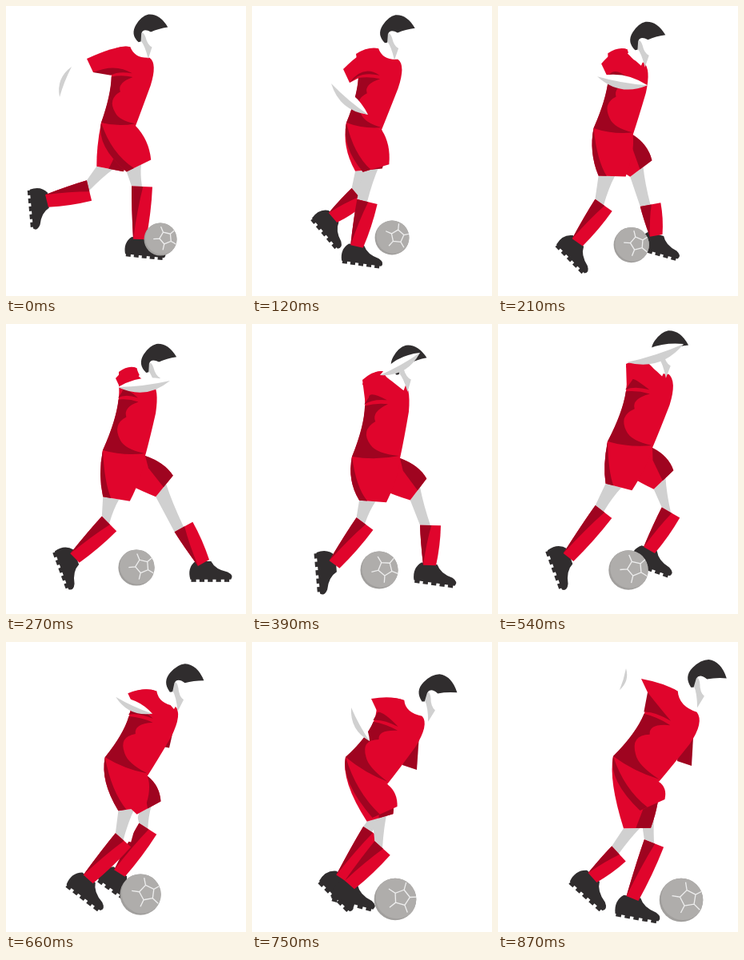
An HTML page with a canvas for the animation above (0.9 s loop, 300 by 363 pixels).

```html
<!DOCTYPE html>
<html lang="en">
<head>
<meta charset="utf-8">
<title>Footballer dribbling</title>
<style>
html, body { margin: 0; width: 100%; height: 100%; overflow: hidden; background: #fff; }
canvas { display: block; width: 300px; height: 363px; }
</style>
</head>
<body>
<canvas id="stage" width="300" height="363"></canvas>
<script>
const ctx = document.getElementById('stage').getContext('2d');
const LOOP = 900, STEP = 30;
const KEYS = [30, 120, 270, 390, 540, 750, 870];
const RED = '#e0052c', DARK = '#9f0420', BLACK = '#302d2e', GREY = '#d0d0d0', WHITE = '#fff';

// Skeleton: where each joint is at every key time; all outlines follow from it.
const RIG = {
  head:      [[178,28], [179,29], [188,43], [193,45], [212,27], [230,59], [259,41]],
  nape:      [[128,58], [130,60], [141,60], [138,70], [160,50], [158,72], [190,56]],
  collar:    [[180,62], [183,64], [183,70], [188,68], [214,60], [214,90], [250,85]],
  waistBack: [[119,146], [118,146], [121,158], [125,166], [137,147], [117,144], [144,143]],
  waist:     [[162,150], [162,155], [174,165], [185,168], [193,155], [169,178], [201,175]],
  sleeve:    [[101,66], [114,79], [137,68], [138,75], [160,53], [149,71], [179,46]],
  elbow:     [[82,76], [99,97], [140,79], [160,64], [161,48], [124,82], [152,60]],
  hand:      [[67,114], [145,136], [205,71], [210,36], [232,25], [147,124], [160,33]],
  ball:      [[193,292], [175,290], [163,305], [159,308], [163,308], [179,322], [229,323]]
};
const LEG_A = {
  hem:   [[130,204], [146,205], [198,203], [208,207], [207,195], [160,220], [174,233]],
  knee:  [[104,231], [133,238], [222,254], [223,252], [216,236], [150,238], [151,265]],
  ankle: [[51,244], [101,265], [247,299], [222,302], [189,283], [112,296], [118,295]],
  foot:  [[85], [50], [0], [8], [20], [45], [42]]
};
const LEG_B = {
  hem:   [[166,200], [155,203], [138,219], [151,222], [151,204], [166,213], [193,204]],
  knee:  [[170,226], [144,245], [129,250], [141,250], [132,235], [163,258], [195,252]],
  ankle: [[167,292], [131,301], [86,293], [103,301], [88,292], [122,304], [168,321]],
  foot:  [[6], [8], [70], [85], [70], [15], [10]]
};

const lerp = (p, q, k) => p.map((n, i) => n + (q[i] - n) * k);
const add = (p, x, y) => [p[0] + x, p[1] + y];

// Smooth interpolation through the key poses.
function at(track, t) {
  const last = KEYS.length - 1;
  if (t <= KEYS[0]) return track[0];
  if (t >= KEYS[last]) return track[last];
  let i = 0;
  while (t >= KEYS[i + 1]) i++;
  const span = KEYS[i + 1] - KEYS[i], u = (t - KEYS[i]) / span, v = 1 - u;
  const slope = (k, n) => {
    const a = Math.max(k - 1, 0), b = Math.min(k + 1, last);
    return (track[b][n] - track[a][n]) / (KEYS[b] - KEYS[a]) * span;
  };
  return lerp(track[i], track[i + 1], u * u * (3 - 2 * u)).map((p, n) =>
    p + slope(i, n) * u * v * v - slope(i + 1, n) * u * u * v);
}

const pose = (rig, t) =>
  Object.fromEntries(Object.entries(rig).map(([name, track]) => [name, at(track, t)]));

// M and L use one point, Q uses two.
function fill(color, cmds, ...pts) {
  let i = 0;
  ctx.beginPath();
  for (const c of cmds) {
    if (c === 'M') ctx.moveTo(...pts[i++]);
    else if (c === 'L') ctx.lineTo(...pts[i++]);
    else ctx.quadraticCurveTo(...pts[i++], ...pts[i++]);
  }
  ctx.fillStyle = color;
  ctx.fill();
}

function placed(pos, angle, scale, paint) {
  ctx.save();
  ctx.translate(...pos);
  ctx.rotate(angle);
  ctx.scale(scale, scale);
  paint();
  ctx.restore();
}

// Two points either side of p, square to the line from a to b.
function across(p, a, b, half) {
  const dx = b[0] - a[0], dy = b[1] - a[1], k = half / Math.hypot(dx, dy);
  return [add(p, -dy * k, dx * k), add(p, dy * k, -dx * k)];
}

function drawBoot() {
  fill(BLACK, 'MLQQLQ', [-10,-2], [9,-2], [14,8], [29,11], [37,15], [33,20],
    [-16,20], [-20,6], [-10,-2]);
  for (let x = -15; x < 30; x += 10) ctx.fillRect(x, 19, 6, 4);
}

function drawLeg(leg, hip, zoom) {
  const { hem, knee, ankle, foot } = leg;
  const [hemBack, hemFront] = across(hem, hip, hem, 17);
  const [back, front] = across(knee, knee, ankle, 13);
  const [heel, shin] = across(ankle, knee, ankle, 8);
  const [calf] = across(lerp(knee, ankle, .4), knee, ankle, 12);
  const [, bone] = across(lerp(knee, ankle, .5), knee, ankle, 13);
  ctx.beginPath();
  ctx.moveTo(...hem);
  ctx.lineTo(...knee);
  ctx.lineWidth = 20;
  ctx.strokeStyle = WHITE;
  ctx.stroke();
  fill(GREY, 'MLQL', hemBack, lerp(hemBack, hemFront, .6), lerp(hem, knee, .4), knee, back);
  placed(ankle, foot[0] * Math.PI / 180, zoom, drawBoot);
  fill(RED, 'MLQLQ', back, front, bone, shin, heel, calf, back);
  fill(DARK, 'MLQQ', back, lerp(back, front, .55), lerp(calf, bone, .3), heel, calf, back);
}

function drawThigh(hem, hip, p, far) {
  const [back, front] = across(hem, hip, hem, 17);
  const seat = add(p.waistBack, -6, 30);
  const lap = add(lerp(p.waist, front, .5), 7, -4);
  fill(RED, 'MLQLQ', p.waistBack, p.waist, lap, front, back, seat, p.waistBack);
  if (far) fill(DARK, 'MQLL', p.waist, lap, front, lerp(front, back, .55), lerp(p.waist, back, .3));
  else fill(DARK, 'MQLQ', p.waistBack, lerp(seat, hem, .35), lerp(back, front, .3),
    back, seat, p.waistBack);
}

function drawShirt(p, lean) {
  // u runs from back to chest, v from shoulder to waist
  const at = (u, v) => lerp(lerp(p.nape, p.collar, u), lerp(p.waistBack, p.waist, u), v);
  const reach = Math.min(1, Math.max(0, (lean - .25) * 3.5));
  fill(DARK, 'MLLL', at(.85, .3), at(1.15, .3),
    lerp(at(1.1, .4), add(p.collar, -8, 70), reach),
    lerp(at(.9, .45), add(p.collar, -26, 64), reach));

  const cuff = add(p.sleeve, 8, 17);
  fill(RED, 'MQLL', at(.5, -.1), at(.2, -.12), p.sleeve, cuff, at(.3, .28));
  fill(RED, 'MQQQQQQL', at(0, 0), at(.25, -.12), at(.5, -.1), at(.65, .06), at(1, .03),
    at(1.22, .1), at(1.17, .42), at(1.08, .75), at(1, 1),
    at(.5, 1.05), at(0, 1), at(.22, .55), at(.12, .25), at(0, 0));
  fill(DARK, 'MQQ', cuff, at(.2, .14), at(.65, .27), at(.3, .25), at(.12, .32));
  fill(DARK, 'MQQQQQQ', at(.14, .34), at(.4, .3), at(.68, .32), at(.3, .42), at(.42, .54),
    at(.1, .66), at(.36, .84), at(.5, .95), at(.98, .97),
    at(.5, 1.04), at(0, 1), at(.18, .6), at(.14, .34));
}

function drawHead() {
  fill(WHITE, 'MLLL', [-14,8], [-26,16], [-13,34], [6,8]);
  fill(GREY, 'MQQLQ', [-13,4], [-7,0], [-6,10], [-6,20], [-1,24], [-9,37], [-9,20], [-13,12]);
  fill(BLACK, 'MQQQQQL', [-16,14], [-24,2], [-14,-8], [-5,-17], [4,-17], [18,-15], [24,4],
    [12,3], [2,5], [-6,-2], [-10,4], [-13,14]);
}

function drawArm(a, b) {
  const mid = lerp(a, b, .5), nx = a[1] - b[1], ny = b[0] - a[0];
  const side = k => add(mid, nx * k, ny * k);
  fill(WHITE, 'MQQ', a, side(-.22), b, side(.25), a);
  fill(GREY, 'MQQ', a, side(.05), b, side(.32), a);
}

function drawBall([x, y], r) {
  const disc = (cx, cy, size, color) => {
    ctx.beginPath();
    ctx.arc(cx, cy, size, 0, 7);
    ctx.fillStyle = color;
    ctx.fill();
  };
  ctx.save();
  ctx.translate(x, y);
  disc(0, 0, r, '#a19f9d');
  ctx.clip();
  disc(r * .08, -r * .08, r, '#afadab');
  ctx.translate(r * .32, -r * .08);
  ctx.rotate((x - 180) / 24);
  ctx.beginPath();
  for (let i = 0; i < 5; i++) {
    const a = i * Math.PI * .4;
    const put = (fn, ang, d) => ctx[fn](Math.cos(ang) * d * r, Math.sin(ang) * d * r);
    put('moveTo', a + Math.PI * .4, .38);
    put('lineTo', a, .38);
    put('lineTo', a, .75);
  }
  ctx.strokeStyle = '#eee';
  ctx.lineWidth = 1.3;
  ctx.stroke();
  ctx.restore();
}

function draw(t) {
  const p = pose(RIG, t), a = pose(LEG_A, t), b = pose(LEG_B, t);
  const hip = lerp(p.waistBack, p.waist, .5), chest = lerp(p.nape, p.collar, .5);
  const lean = (chest[0] - hip[0]) / (hip[1] - chest[1]);
  const zoom = 1 + .12 * t / LOOP;

  ctx.fillStyle = WHITE;
  ctx.fillRect(0, 0, 300, 363);
  drawLeg(a, hip, zoom);
  drawLeg(b, hip, zoom);
  drawThigh(a.hem, hip, p, true);
  drawThigh(b.hem, hip, p, false);
  drawShirt(p, lean);
  placed(p.head, (lean - .54) * .6, zoom, drawHead);
  drawArm(p.elbow, p.hand);
  drawBall(p.ball, 20.5 + 7 * t / LOOP);
}

const start = performance.now();
function tick() {
  const t = (performance.now() - start) % LOOP;
  draw(Math.floor(t / STEP) * STEP);
  requestAnimationFrame(tick);
}
tick();
</script>
</body>
</html>
```
